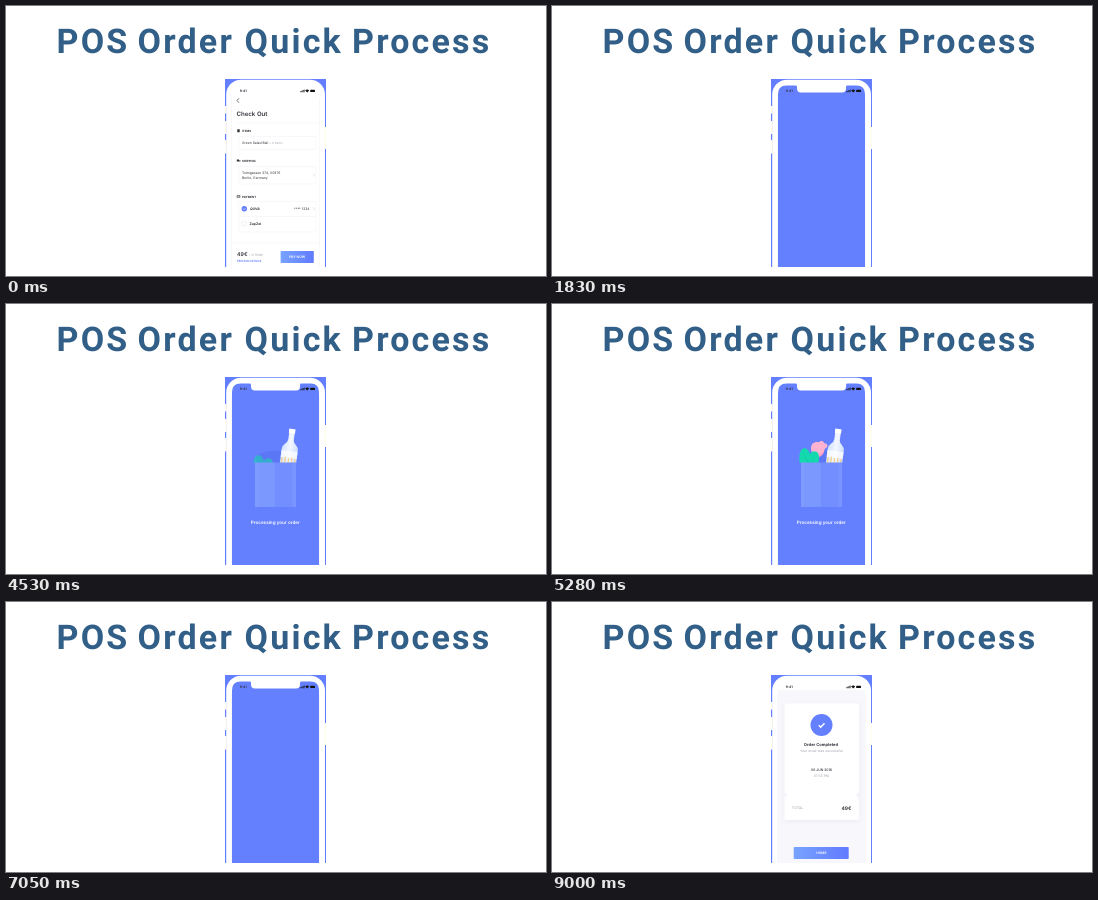
An HTML page that plays this animation: 540 px wide and 270 px high, repeating every 9930 ms.

```html
<!DOCTYPE html>
<html lang="en">
<head>
<meta charset="utf-8">
<title>POS Order Quick Process</title>
<style>
  html, body { margin: 0; width: 100%; height: 100%; overflow: hidden; background: #fff; }
  svg { display: block; width: 100%; height: 100%; text-rendering: geometricPrecision; }
  text { font-family: Inter, Roboto, sans-serif; font-size: 3.4px; fill: #33343c; }
  .title text { font: 700 34px Roboto, sans-serif; letter-spacing: 2.2px; fill: #325f87; }
  .head { font-size: 2.9px; font-weight: 700; }
  .bold { font-weight: 700; }
  .grey { fill: #9fa1ab; }
  .mid { text-anchor: middle; }
  .end { text-anchor: end; }
  .button { font-weight: 600; fill: #fff; text-anchor: middle; }
  .rule { stroke: #f3f3f6; stroke-width: .6; fill: none; }
  .arrow { stroke: #c3c5cf; stroke-width: .5; fill: none; }
</style>
</head>
<body>
<svg viewBox="0 0 540 270">
  <defs>
    <clipPath id="stage"><path d="M219 73H320V261H219Z"/></clipPath>
    <clipPath id="screen"><path d="M226 261V88Q226 79.5 234.500 79.500H304.500Q313 79.500 313 88V261Z"/></clipPath>
    <clipPath id="aboveBag"><path d="M226 79H313V159H226Z"/></clipPath>
    <linearGradient id="action"><stop stop-color="#78a3ff"/><stop offset="1" stop-color="#617aff"/></linearGradient>
    <linearGradient id="glass"><stop stop-color="#d3e2ff"/><stop offset=".5" stop-color="#f3f7ff"/><stop offset="1" stop-color="#cfdfff"/></linearGradient>
    <filter id="shadow" x="-20%" y="-20%" width="140%" height="140%"><feDropShadow dx="0" dy="1" stdDeviation="2" flood-color="#5b6690" flood-opacity=".1"/></filter>
  </defs>

  <g class="title">
    <text x="50.500" y="47">POS</text>
    <text x="131.500" y="47">Order</text>
    <text x="238.500" y="47">Quick</text>
    <text x="346" y="47">Process</text>
  </g>

  <g clip-path="url(#stage)">
    <path fill="#637fff" d="M219 73H320V261H219Z"/>
    <rect x="220.200" y="73.700" width="98.800" height="220" rx="15" fill="#fff"/>
    <path fill="#fffdf0" d="M219 100h1.500v7.500h-1.500zM219 115h1.500v13h-1.500zM219 134h1.500v13.500h-1.500zM318.500 121h1.500v22h-1.500z"/>
    <path class="rule" d="M225.500 261V92M313.500 261V92"/>

    <g clip-path="url(#screen)">
      <g id="checkout">
        <path d="M233 92.300l-2 2.200 2 2.200" fill="none" stroke="#333" stroke-width=".7"/>
        <text x="230.500" y="109.600" style="font-size:6.100px;font-weight:600">Check Out</text>
        <path class="rule" d="M231 117H313M233 130.500H310V143.500H233ZM233 160.500H310V178H233ZM233 195.500H310V226H233ZM233 210.500H310M226 237H313"/>
        <path fill="#333" d="M231.300 123.300h2.400v3h-2.400zM230.800 153.600h2.200v2h-2.200zM233.200 154.200h1.200v1.400h-1.200z"/>
        <path fill="none" stroke="#333" stroke-width=".5" d="M231 189.500h3v2h-3zM231 190.200h3"/>
        <text class="head" x="236" y="126">ITEMS</text>
        <text x="236" y="138">Green Salad Ball <tspan class="grey" font-size="3">+ 2 Items</tspan></text>
        <text class="head" x="236" y="156">SHIPPING</text>
        <text x="236" y="168.300">Tolmgassen 274, 00876</text>
        <text x="236" y="173.300">Berlin, Germany</text>
        <text class="head" x="236" y="191.600">PAYMENT</text>
        <path class="arrow" d="M307.300 167.800l1.200 1.300-1.200 1.300M307.300 201.400l1.200 1.300-1.200 1.300"/>
        <circle cx="238.300" cy="202.700" r="2.700" fill="#617cff"/>
        <path d="M237 202.700l1 1 1.700-1.900" fill="none" stroke="#fff" stroke-width=".6"/>
        <circle cx="238.300" cy="217.500" r="2.400" fill="#fff" stroke="#dfe0e8" stroke-width=".5"/>
        <text class="bold" x="244" y="204" font-style="italic">QUVA</text>
        <text class="end" x="303.500" y="204">**** 1234</text>
        <text class="bold" x="243.500" y="218.900">ZupZel</text>
        <text x="231" y="250" style="font-size:5.300px;font-weight:600">49€</text>
        <text class="grey" x="243" y="249.800" style="font-size:3px">/ 3 ITEMS</text>
        <text x="231" y="255.600" style="font-size:2.900px;font-weight:600;fill:#617cff">PRICING DETAILS</text>
        <rect x="274.600" y="245" width="33.200" height="12" rx=".8" fill="url(#action)"/>
        <text class="button" x="291.200" y="252.300">PAY NOW</text>
      </g>

      <g id="receipt">
        <path fill="#f8f8fc" d="M226 88H313V261H226Z"/>
        <g id="card">
          <rect x="232.500" y="101.500" width="74.500" height="116.500" rx="1.500" fill="#fff" filter="url(#shadow)"/>
          <path fill="#f3f4f9" d="M232.500 190.500a2.500 2.500 0 0 1 0 5zM307 190.500a2.500 2.500 0 0 0 0 5z"/>
        </g>
      </g>

      <rect id="flood" fill="#6480ff"/>
      <path id="tick" d="M266.800 123.300l1.900 1.900 3.800-4" fill="none" stroke="#fff" stroke-width="1.500"/>

      <g id="details">
        <text class="mid bold" x="269" y="144.200" style="font-size:4.100px">Order Completed</text>
        <text class="mid grey" x="269.300" y="149.500">Your order was successful</text>
        <text class="mid" x="269.500" y="169.300" font-weight="500">06 JUN 2018</text>
        <text class="mid grey" x="269.300" y="174.500">07:53 PM</text>
        <text class="grey" x="239.800" y="207.300" style="font-size:3.600px">TOTAL</text>
        <text class="end bold" x="299.300" y="208" style="font-size:4.900px">49€</text>
        <rect x="241.700" y="245" width="55" height="12" rx=".8" fill="url(#action)"/>
        <text class="button" x="269.300" y="252.300">HOME</text>
      </g>

      <g id="order">
        <g id="bag">
          <ellipse cx="269.500" cy="154" rx="19" ry="7.500" fill="#5b77f5"/>
          <g clip-path="url(#aboveBag)">
            <g id="ham">
              <path fill="#ffb3d0" d="M259 144c0-5 4-7 8-6 2-2 5-1 5 1 3 0 4 2 3 4-2 1-3 2-3 5-3 4-8 5-10 2-2-1-3-3-3-6z"/>
              <path fill="#ff9fc4" d="M262 150c4 2 7 0 10-4 0 4-3 7-7 7z"/>
            </g>
            <g id="greens">
              <path fill="#14d9ae" d="M248 162c-1-8-1-14 2-17 4-2 7 1 8 5 2-4 6-3 8-1 2 4 1 9-1 13z"/>
              <path fill="#0cbfa5" d="M250 147l7 12h-1zM264 151l-4 8h-1z" opacity=".7"/>
            </g>
            <g id="bottle">
              <g transform="rotate(7.500 282 159)">
                <path fill="url(#glass)" d="M279.200 125h5.600v10.500q0 3 3 5 2.300 2 2.300 5V166H273.900V145.500q0-3 2.300-5 3-2 3-5z"/>
                <path fill="#fff" d="M278.900 124.700h6.200v4.300h-6.200z"/>
                <path fill="#fff" d="M273.900 147h16.200v7H273.900z" opacity=".7"/>
                <path stroke="#f3d28f" stroke-width="1.300" d="M275.500 154v9M278.700 153v10M282 154v9M285.200 153v10M288.500 154v9"/>
              </g>
            </g>
          </g>
          <path fill="#7b98ff" d="M249 158.500h20.500V203H249z"/>
          <path fill="#728eff" d="M269.500 158.500H290V203H269.500z"/>
          <path fill="#839eff" d="M249 158.500h3V203h-3zM286.500 158.500h3.500V203h-3.500z" opacity=".45"/>
        </g>
        <text class="mid" x="269.300" y="220.200" style="font-size:4.600px;font-weight:600;fill:#fff">Processing your order</text>
      </g>
    </g>

    <path id="notch" fill="#fff" d="M243.500 79h52q-1.500 0-1.500 2v1.500q0 4-4 4h-41q-4 0-4-4V81q0-2-1.500-2z"/>
    <g fill="#111">
      <text class="bold" x="233.800" y="86.300" style="font-size:3.300px">9:41</text>
      <path d="M294.500 85h.7v1.300h-.7zM295.600 84.600h.7v1.700h-.7zM296.700 84.100h.7v2.200h-.7zM297.800 83.500h.7v2.800h-.7z"/>
      <path d="M299.200 84.400q2-1.600 4 0l-2 2z"/>
      <rect x="304.200" y="83.700" width="4.800" height="2.400" rx=".6"/>
    </g>
  </g>
</svg>

<script>
const LOOP = 9930;
const part = {};
for (const el of document.querySelectorAll('svg [id]')) part[el.id] = el;

const clamp = v => Math.max(0, Math.min(1, v));
const progress = (t, from, to) => clamp((t - from) / (to - from));
const easeIn = (p, power = 3) => p ** power;
const easeOut = (p, power = 3) => 1 - (1 - p) ** power;
const easeInOut = p => p * p * (3 - 2 * p);
const mix = (a, b, p) => a + (b - a) * p;
const fade = (el, value) => el.setAttribute('opacity', value);

function setFlood(left, top, right, bottom, radius) {
  const box = { x: left, y: top, width: right - left, height: bottom - top, rx: radius };
  for (const key in box) part.flood.setAttribute(key, box[key]);
}

function rise(el, distance, p) {
  el.setAttribute('transform', `translate(0 ${distance * (1 - easeOut(p))})`);
}

function draw(t) {
  const shrink = easeInOut(progress(t, 7050, 7560));

  fade(part.checkout, t < 1140 ? 1 - progress(t, 840, 990) : 0);
  fade(part.receipt, t >= 7050 ? 1 : 0);
  fade(part.card, progress(t, 7320, 7680));
  fade(part.tick, progress(t, 7530, 7800));
  fade(part.details, easeInOut(progress(t, 8310, 9000)));
  fade(part.flood, t > 840 ? 1 : 0);
  fade(part.notch, t >= 1050 && t < 7500 ? 1 : 0);

  if (t < 7050) {
    // The pay button spreads until it covers the screen.
    const p = progress(t, 840, 1140), widen = easeOut(p, 1.65), edge = clamp(p * 2);
    setFlood(mix(275, 226, widen), mix(245, 79, easeIn(p, 1.65)), mix(308, 313, edge), mix(257, 261, edge), 0);
  } else {
    // The blue screen closes into the badge.
    const r = mix(150, 11, shrink), y = mix(170, 123, shrink);
    setFlood(269.5 - r, y - r, 269.5 + r, y + r, r);
  }

  fade(part.order, easeInOut(progress(t, 1830, 2520)) * (1 - progress(t, 6450, 6750)));

  const bottle = progress(t, 3570, 4200);
  const greens = progress(t, 4410, 4950);
  const ham = progress(t, 4770, 5400);
  rise(part.bottle, 36, bottle);
  rise(part.greens, 15, greens);
  rise(part.ham, 23, ham);
  fade(part.bottle, clamp(bottle * 3));
  fade(part.greens, clamp(greens * 2.5));
  fade(part.ham, clamp(ham * 2.5));

  const sway = progress(t, 5430, 6420);
  const scale = 1 + 0.02 * Math.sin(sway * Math.PI * 2) * (1 - sway);
  part.bag.setAttribute('transform', `translate(269.5 203) scale(${scale}) translate(-269.5 -203)`);
}

const start = performance.now();
function tick() {
  draw((performance.now() - start) % LOOP);
  requestAnimationFrame(tick);
}
tick();
</script>
</body>
</html>
```
